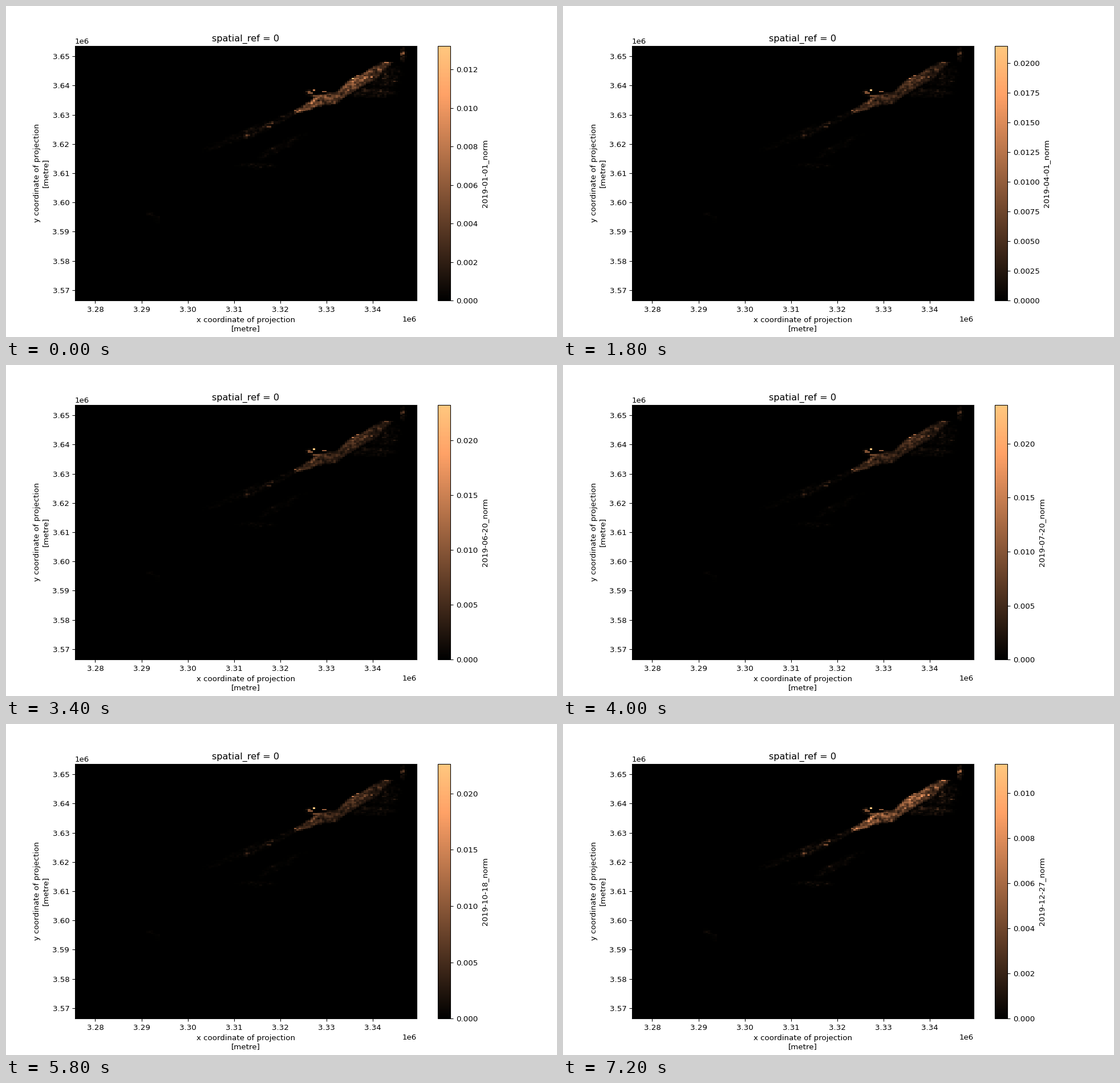
Animation of 966x580 px, one loop 7.4 s. Source, as a matplotlib script:

```python
import numpy as np
import matplotlib.pyplot as plt
from matplotlib.animation import FuncAnimation

FRAMES, INTERVAL = 37, 200
COLS, ROWS = 148, 175
X_RANGE = (3.275594e6, 3.349416e6)
Y_RANGE = (3.653654e6, 3.566404e6)

# Pixel geometry of the map, used to place shapes on the cell grid.
LEFT, TOP = 120.75, 69.6
CELL_W, CELL_H = 598.92 / COLS, 446.6 / ROWS

rng = np.random.default_rng(19)
px, py = np.meshgrid(LEFT + (np.arange(COLS) + 0.5) * CELL_W,
                     TOP + (np.arange(ROWS) + 0.5) * CELL_H)


def speckle(sigma):
    """Log-normal noise with a mean of one, slightly clumped."""
    noise = rng.normal(0, 1, px.shape)
    noise = noise + 0.6 * np.roll(noise, 1, axis=1) + 0.5 * np.roll(noise, 1, axis=0)
    noise *= sigma / noise.std()
    return np.exp(noise - sigma ** 2 / 2)


def patch(x, y, rx, ry, slope, level, sigma=0.8):
    """Speckled ellipse, sheared along a slope, with a soft edge."""
    dx = px - x
    reach = (dx / rx) ** 2 + ((py - y - slope * dx) / ry) ** 2
    return level * np.exp(-reach ** 2) * speckle(sigma)


def band():
    """Main streak between an upper and a lower edge, fading to the north-east."""
    xs = [505, 530, 545, 580, 600, 622, 645, 662, 678]
    upper = np.interp(px, xs, [184, 168, 155, 150, 130, 119, 104, 96, 97])
    lower = np.interp(px, xs, [189, 184, 177, 171, 157, 142, 131, 118, 100])
    depth = (py - upper) / (lower - upper)
    inside = (px > xs[0]) & (px < xs[-1]) & (depth > 0) & (depth < 1)
    east = np.clip((px - 615) / 50, 0, 1)
    ragged = np.clip(4 * np.minimum(depth, 1 - depth) + 0.35, 0, 1)
    return 0.0041 * inside * ragged * (1 - east * (0.2 + 0.6 * depth)) * speckle(0.4)


def build_glow():
    ridge = patch(604, 135, 19, 5, -0.75, 0.0022, 0.4)
    haze = [
        patch(640, 152, 38, 8, 0, 0.0013),
        patch(666, 128, 24, 20, -0.3, 0.0006),
        patch(696, 85, 4.5, 11, 0, 0.002),
        patch(532, 153, 7, 5, 0, 0.002),
        patch(435, 219, 32, 9, -0.4, 0.0008),
        patch(475, 202, 35, 6, -0.5, 0.0008),
        patch(385, 238, 35, 7, -0.4, 0.0003),
        patch(480, 247, 38, 8, -0.5, 0.0004),
        patch(441, 280, 30, 5, 0, 0.0004),
        patch(259, 369, 11, 8, 0.5, 0.0003),
    ]
    return np.maximum(band() + ridge, np.max(haze, axis=0))


glow = build_glow()


def light(grid, x, y, value, width=1):
    col, row = int((x - LEFT) / CELL_W), int((y - TOP) / CELL_H)
    grid[row, col:col + width] = value


def peak_at(step):
    return np.interp(step, [0, 5, 6, 13, 20, 29, 31, 36],
                     [0.01324, 0.0126, 0.0205, 0.02275, 0.02359, 0.02265, 0.0205, 0.0113])


def image_at(step, peak):
    """The glow stays steady; a few cells swell with the peak."""
    grid = np.minimum(glow, 0.0085)
    early = max(0, 1 - step / 5)

    light(grid, 641, 125, 0.0082)
    light(grid, 664, 98, 0.0078, 2)
    light(grid, 458, 211, 0.004, 2)

    light(grid, 533, 150, 0.42 * peak)
    light(grid, 531, 153, 0.4 * peak, 2)
    light(grid, 540, 157, 0.35 * peak, 3)
    light(grid, 555, 151, 0.48 * peak, 2)
    light(grid, 509, 184, 0.45 * peak)
    light(grid, 617, 121, 0.5 * peak)
    light(grid, 609, 126, (0.62 + 0.38 * early) * peak)
    light(grid, 538, 148, (1 - 0.4 * early) * peak)
    return grid


# Slightly above 580 px tall so that rounding down is exact.
fig, ax = plt.subplots(figsize=(10, 6.00415), dpi=96.6)
mesh = ax.pcolormesh(np.linspace(*X_RANGE, COLS + 1), np.linspace(*Y_RANGE, ROWS + 1),
                     glow, cmap="copper", vmin=0, vmax=peak_at(0))
ax.set_ylim(Y_RANGE[1], Y_RANGE[0])
ax.set_title("spatial_ref = 0")
ax.set_xlabel("x coordinate of projection\n[metre]")
ax.set_ylabel("y coordinate of projection\n[metre]")
bar = fig.colorbar(mesh, ax=ax)


def update(step):
    peak = peak_at(step)
    mesh.set_array(image_at(step, peak))
    mesh.set_clim(0, peak)
    date = np.datetime64("2019-01-01") + 10 * int(step)
    bar.set_label(f"{date}_norm")
    return [mesh]


anim = FuncAnimation(fig, update, frames=FRAMES, interval=INTERVAL,
                     repeat=True, repeat_delay=0, blit=False)
plt.show()
```
